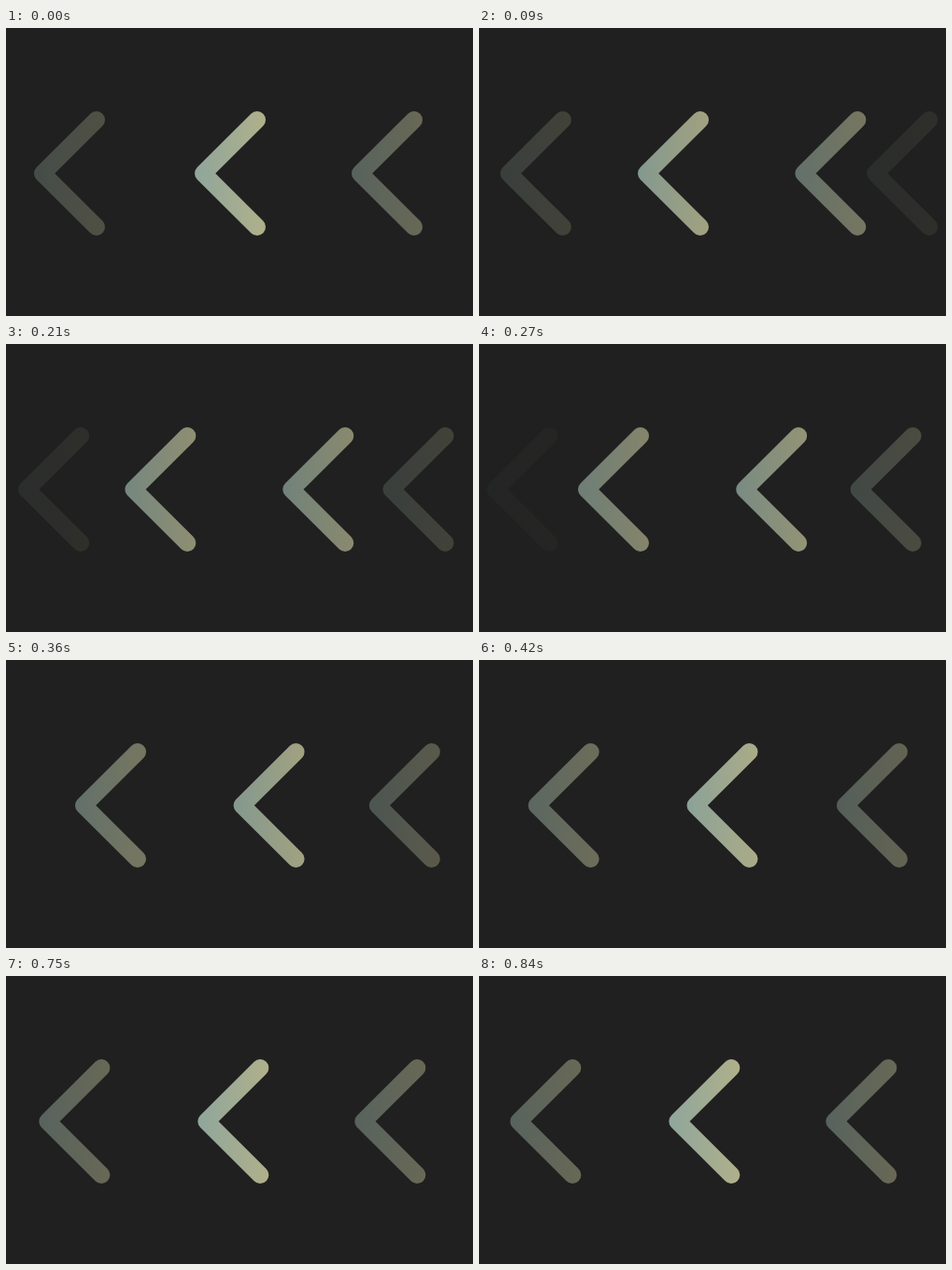
An HTML page that plays this animation: 500 by 308 pixels, repeating every 900 ms.

```html
<!DOCTYPE html>
<html lang="en">
<head>
<meta charset="utf-8">
<title>Sliding chevrons</title>
<style>
  html, body { margin: 0; width: 100%; height: 100%; overflow: hidden; background: #202020; }
  svg { display: block; width: 100%; height: 100%; }
</style>
</head>
<body>
<svg viewBox="0 0 500 308">
  <defs>
    <linearGradient id="tint" gradientUnits="userSpaceOnUse" x1="0" y1="0" x2="76" y2="0">
      <stop offset="0" stop-color="#8fa69c"/>
      <stop offset="1" stop-color="#b0b08a"/>
    </linearGradient>
    <path id="chevron" d="M66.8 98.2 L9.2 155.5 L66.8 212.8" fill="none" stroke="url(#tint)"
      stroke-width="18.4" stroke-linecap="round" stroke-linejoin="round"/>
  </defs>
  <use href="#chevron"/>
  <use href="#chevron"/>
  <use href="#chevron"/>
  <use href="#chevron"/>
</svg>
<script>
const LOOP = 900, SLIDE = 450, STEP = 30, DRIFT = 10;

// x: start and end of the fast slide; alpha: opacity over the same span
const tracks = [
  { x: [30, -6], alpha: [1 / 3, -1 / 6] },
  { x: [202, 42], alpha: [1, 0.5] },
  { x: [370, 212], alpha: [0.5, 1] },
  { x: [424, 380], alpha: [0, 0.5] },
];
const chevrons = document.querySelectorAll('use');
const mix = ([a, b], k) => a + (b - a) * k;

function draw(now) {
  const t = Math.floor(((now + 1) % LOOP) / STEP) * STEP;
  const slide = Math.min(t / SLIDE, 1);
  const drift = DRIFT * Math.max(t / SLIDE - 1, 0);
  tracks.forEach(({ x, alpha }, i) => {
    chevrons[i].setAttribute('transform', `translate(${mix(x, slide) - drift} 0)`);
    chevrons[i].setAttribute('opacity', Math.max(mix(alpha, slide), 0));
  });
}

function tick(now) {
  draw(now);
  requestAnimationFrame(tick);
}
draw(0);
requestAnimationFrame(tick);
</script>
</body>
</html>
```
